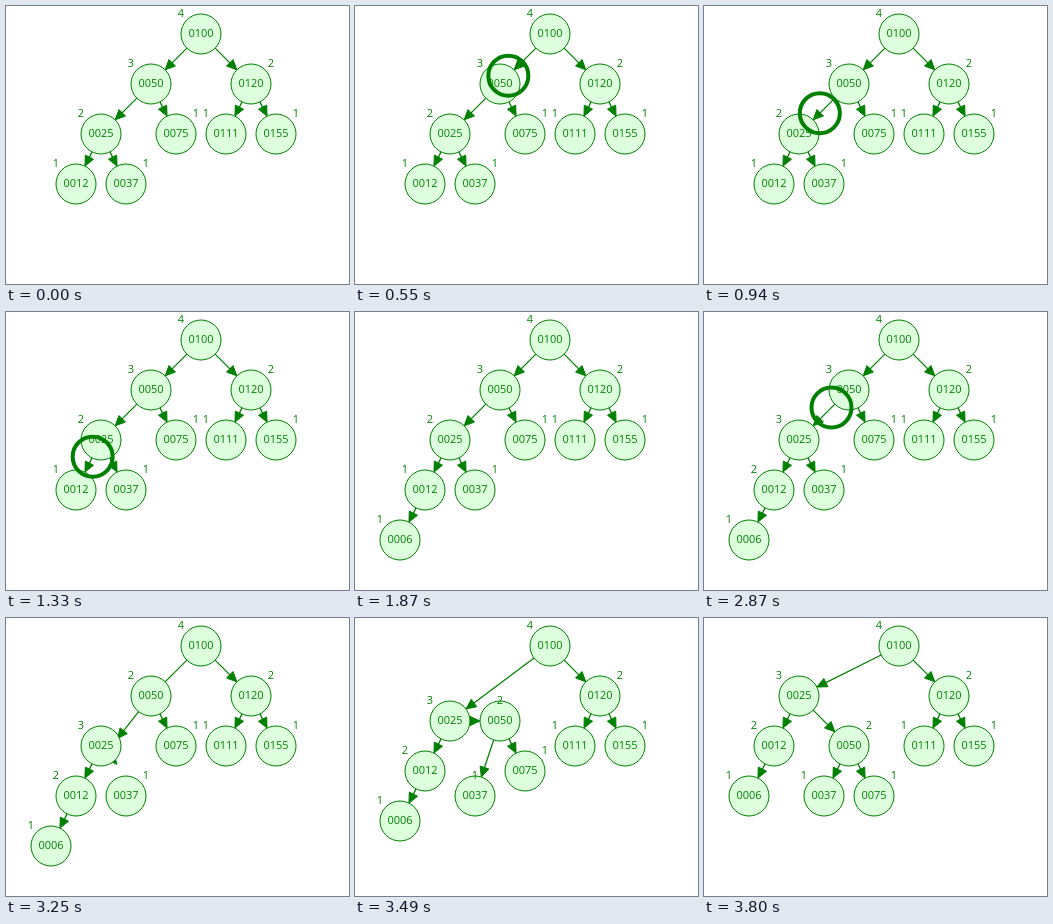
Recreate the animation shown at these times as an HTML page. Size 343x278 px, loop 4270 ms.

```html
<!DOCTYPE html>
<html lang="en">
<head>
<meta charset="utf-8">
<title>AVL tree insertion</title>
<style>
  html, body { margin: 0; width: 100%; height: 100%; overflow: hidden; background: #fff; }
  svg { display: block; width: 343px; height: 278px; }
  text { font: 11px "Open Sans", "Noto Sans", sans-serif; fill: #008000; text-anchor: middle; }
  .node { fill: #ddffdd; stroke: #008000; }
  .edge { stroke: #008000; stroke-width: 1.25; }
  .head { fill: #008000; stroke: #008000; }
  .ring { fill: none; stroke: #008000; stroke-width: 4; }
</style>
</head>
<body>
<svg id="stage" viewBox="0 0 343 278"></svg>
<script>
const LOOP = 4270, LEAD = 237, STEP = 77.4, LAST = 46, R = 20;
const stage = document.getElementById('stage');

// Timing, counted in animation steps
const MOVE = 3, VISIT = 5.75, ARRIVE = -1.25;
const SEARCHED = 19, INSERT = 20, CLIMB = 20.95, CLIMB_GAP = 5.55;
const RELINK = 37.5, ROTATE = 40.5, RETURN = 43.7;

const order = [100, 50, 120, 25, 75, 111, 155, 12, 37, 6];
const sorted = [...order].sort((a, b) => a - b);
const path = [100, 50, 25, 12, 6];

const clamp = v => Math.max(0, Math.min(1, v));
const mix = (a, b, p) => a + (b - a) * p;

// Inserts the keys in turn; x follows the sorted rank, y the depth
function grow(keys) {
  const tree = {};
  for (const key of keys) {
    let at = keys[0], depth = 0, side = 'left';
    while (tree[at]) {
      const parent = tree[at];
      side = key < at ? 'left' : 'right';
      depth++;
      if (!parent[side]) { parent[side] = key; break; }
      at = parent[side];
    }
    tree[key] = { x: 45 + 25 * sorted.indexOf(key), y: 28 + 50 * depth, tag: side === 'left' ? -R : R };
  }
  const measure = key => key ? tree[key].h = 1 + Math.max(measure(tree[key].left), measure(tree[key].right)) : 0;
  measure(keys[0]);
  return tree;
}

const small = grow(order.slice(0, -1));
const grown = grow(order);
// Rotating at 50 gives the tree that has 25 inserted ahead of it
const turned = grow([100, 25, ...order.filter(k => k !== 100 && k !== 25)]);

function blend(a, b, p) {
  return { x: mix(a.x, b.x, p), y: mix(a.y, b.y, p), tag: mix(a.tag, b.tag, p) };
}

function layout(n) {
  const tree = {}, p = clamp((n - ROTATE) / MOVE);
  for (const key of n < INSERT ? order.slice(0, -1) : order) {
    const climb = path.length - 2 - path.indexOf(key);
    const updated = !small[key] || n >= CLIMB + climb * CLIMB_GAP + MOVE;
    const source = n > RELINK ? turned : updated ? grown : small;
    tree[key] = { ...blend(grown[key], turned[key], p), h: source[key].h };
  }
  // the new node first shows up beside its parent
  if (n === INSERT) Object.assign(tree[6], { x: tree[12].x - 50, y: tree[12].y });
  return tree;
}

function arrow(a, b) {
  const dx = b.x - a.x, dy = b.y - a.y, d = Math.hypot(dx, dy);
  if (d <= 2 * R) return '';
  const at = (s, w) => [a.x + (dx * s - dy * w) / d, a.y + (dy * s + dx * w) / d];
  const [x1, y1] = at(R, 0), [x2, y2] = at(d - R - 5, 0);
  const head = [at(d - R, 0), at(d - R - 10, 4.6), at(d - R - 10, -4.6)].join(' ');
  return `<line class="edge" x1="${x1}" y1="${y1}" x2="${x2}" y2="${y2}"/><polygon class="head" points="${head}"/>`;
}

const label = (x, y, s) => `<text x="${x}" y="${y}">${s}</text>`;
const circle = (name, { x, y }, r) => `<circle class="${name}" cx="${x}" cy="${y}" r="${r}"/>`;

function ring(n, tree) {
  const glide = (from, to, p, r = R) => circle('ring', blend(tree[from], tree[to], p), r);
  if (n >= 0 && n < SEARCHED) {
    // each visit: pulse, short rest, move on
    const i = Math.floor((n - ARRIVE) / VISIT), age = (n - ARRIVE) % VISIT;
    const p = clamp((age - VISIT + MOVE) / MOVE);
    return glide(path[i], p ? path[i + 1] : path[i], p, R + 5 * clamp(1 - Math.abs(age - 1)));
  }
  if (n > RETURN) {
    const p = (n - RETURN) / 2;
    return p < 1 ? glide(25, 100, p) : '';
  }
  if (n > CLIMB && n < RELINK) {
    const i = Math.floor((n - CLIMB) / CLIMB_GAP);
    const p = (n - CLIMB - i * CLIMB_GAP) / MOVE;
    const from = path.length - 1 - i;
    if (p > 0.1 && p < 1) return glide(path[from], path[from - 1], p);
  }
  return '';
}

function draw(n) {
  const tree = layout(n), p = clamp((n - RELINK) / MOVE);
  let edges = '', nodes = '', tags = '';
  for (const key in tree) {
    const node = tree[key];
    for (const side of ['left', 'right']) {
      const child = tree[grown[key][side]], next = tree[turned[key][side]];
      if (child) edges += arrow(node, blend(child, next || child, p));
    }
    nodes += circle('node', node, R) + label(node.x, node.y + 3, key.padStart(4, '0'));
    tags += label(node.x + node.tag, node.y - 17, node.h);
  }
  stage.innerHTML = edges + nodes + tags + ring(n, tree);
}

let shown;
const origin = performance.now();
function tick() {
  const t = (performance.now() - origin) % LOOP;
  const n = Math.max(-1, Math.min(LAST, Math.floor((t - LEAD) / STEP)));
  if (n !== shown) draw(shown = n);
  requestAnimationFrame(tick);
}
tick();
</script>
</body>
</html>
```
